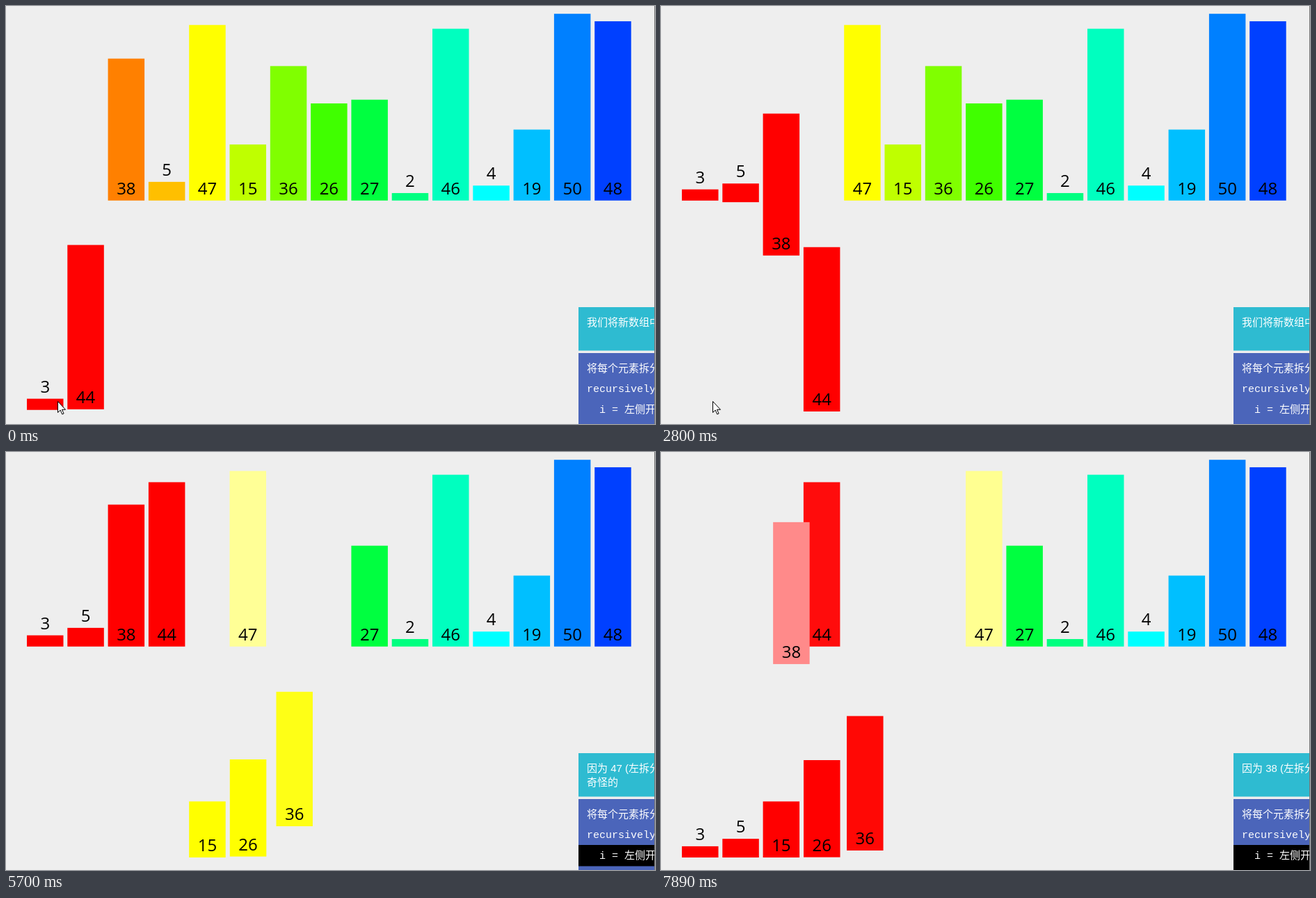
Recreate the animation shown at these times as an HTML page with a canvas. Size 933 by 601 pixels, loop 8000 ms.

```html
<!DOCTYPE html>
<html lang="zh">
<head>
<meta charset="utf-8">
<style>
  html, body { margin: 0; width: 100%; height: 100%; overflow: hidden; background: #eee; }
  canvas { display: block; }
</style>
</head>
<body>
<canvas id="stage" width="933" height="601"></canvas>
<script>
const ctx = document.getElementById('stage').getContext('2d');
const LOOP = 8000, MOVE = 240, TICK = 120, CURSOR_GONE = 5170;
const SLOT = 58.3, BAR = 52.5, LEFT = 30, FLOOR = 279.7, DROP = 303.3, UNIT = 5.37;
const SANS = '"Liberation Sans", "Noto Sans CJK SC", "Noto Sans CJK", sans-serif';
const MONO = '"Liberation Mono", "Noto Sans CJK SC", "Noto Sans CJK", monospace';

const values = [3, 44, 38, 5, 47, 15, 36, 26, 27, 2, 46, 4, 19, 50, 48];
const merges = [[0, 1, 2], [2, 3, 4], [0, 2, 4], [4, 5, 6], [6, 7, 8], [4, 6, 8], [0, 4, 8]];

// The picture is refreshed in runs of even ticks; each run starts at one of these times.
const runs = [0, 250, 400, 790, 940, 1090, 1240, 1510, 1900, 2290, 2680, 2950, 3100, 3370, 3880,
  4630, 4780, 5170, 5550, 5700, 6210, 6360, 6630, 7500, 7770, 8010];

// [step, start time]; steps in between are evenly spaced.
const beats = [[-3, -620], [-1, -236], [0, -29], [1, 178], [4, 728], [5, 930], [10, 1871], [11, 2078],
  [18, 3428], [23, 4385], [29, 5540], [33, 6304], [41, 7824], [61, 11640]];

const lerp = (a, b, k) => a + (b - a) * k;
const ease = t => t >= 1 ? 1 : t < 0.5 ? 4 * t ** 3 : 1 - 4 * (1 - t) ** 3;

// Colour wheel of 24 hues; pure green is skipped.
function hue(slot) {
  const h = slot < 8 ? slot : slot + 1;
  return [0, 8, 16].map(peak => {
    const d = Math.abs(h - peak);
    return Math.max(0, Math.min(255, (8 - Math.min(d, 24 - d)) * 63.75));
  });
}
const lighten = color => color.map(c => Math.min(255, c + 150));

function startOf(step) {
  const i = beats.findIndex(b => b[0] > step);
  const [a, ta] = beats[i - 1], [b, tb] = beats[i];
  return lerp(ta, tb, (step - a) / (b - a));
}

// Poses are [slot, row, r, g, b], one per value.
function buildSteps() {
  const steps = [], order = values.map((_, i) => i);
  const base = values.map((_, i) => hue(i));
  const goal = values.map((_, i) => [i, 0, ...base[i]]);
  const push = (message, lines) => steps.push({ message, lines, goal: goal.map(p => [...p]) });
  const paint = (id, color) => goal[id].splice(2, 3, ...color);

  for (const [lo, mid, hi] of merges) {
    const left = order.slice(lo, mid), right = order.slice(mid, hi), merged = [];
    const color = hue(lo);
    const markHeads = () => [left[0], right[0]].forEach(id => {
      if (id !== undefined) paint(id, lighten(base[id]));
    });
    markHeads();
    push(['我们现在合并拆分的部分'], [1]);
    while (left.length || right.length) {
      const l = values[left[0]], r = values[right[0]];
      const fromLeft = !right.length || l <= r;
      const message = !right.length ? ['因为右拆分是空的'] : !left.length ? ['因为左拆分是空的']
        : fromLeft ? [`因为 ${l} (左拆分) <= ${r}`] : [`因为 ${l} (左拆分) > ${r}`, '奇怪的'];
      const id = (fromLeft ? left : right).shift();
      goal[id][0] = lo + merged.push(id) - 1;
      goal[id][1] = 1;
      paint(id, color);
      markHeads();
      push(message, fromLeft ? [2, 3] : [2]);
    }
    merged.forEach((id, i) => {
      order[lo + i] = id;
      base[id] = color;
      goal[id][1] = 0;
      push(['我们将新数组中的元素'], []);
    });
  }

  steps.forEach((step, i) => {
    step.start = startOf(i - 3);
    step.from = i ? poseAt(steps[i - 1], step.start) : values.map((_, k) => [k, 0, ...hue(k)]);
  });
  return steps;
}

// Every step restarts the easing of all bars from wherever they are.
function poseAt(step, time) {
  const k = ease((time - step.start) / MOVE);
  return step.from.map((pose, id) => pose.map((v, j) => lerp(v, step.goal[id][j], k)));
}

function rect(color, x, y, w, h) {
  ctx.fillStyle = color;
  ctx.fillRect(x, y, w, h);
}

function text(str, x, y, font, color = '#fff', align = 'left') {
  ctx.font = font;
  ctx.fillStyle = color;
  ctx.textAlign = align;
  ctx.fillText(str, x, y);
}

function drawBars(poses) {
  const boxes = poses.map(([slot, row, ...rgb], id) => {
    const h = values[id] * UNIT;
    return { x: LEFT + slot * SLOT, y: FLOOR + row * DROP - h, h, rgb };
  });
  for (const { x, y, h, rgb } of boxes) rect(`rgb(${rgb.map(Math.round)})`, x, y, BAR, h);
  boxes.forEach(({ x, y, h }, id) => {
    const baseline = (values[id] < 8 ? y : y + h) - 9;
    text(values[id], x + BAR / 2, baseline, '24px "Open Sans", sans-serif', '#000', 'center');
  });
}

function drawPanel({ message, lines }) {
  rect('#2ebbd1', 823, 433, 110, 62.5);
  message.forEach((line, i) => text(line, 835, 460 + i * 20, `500 15px ${SANS}`));
  rect('#4b65ba', 823, 499, 110, 102);
  for (const n of lines) rect('#000', 823, 505 + n * 30, 110, 30.5);
  text('将每个元素拆分成', 835, 525.5, `15px ${MONO}`);
  text('recursively', 835, 554.5, `15px ${MONO}`);
  text('i = 左侧开头', 853, 585, `15px ${MONO}`);
  rect('#777', 932, 0, 1, 601);
}

const arrow = new Path2D('M74.5 568.5v16l3.7-3.5 2.6 6 2.3-1-2.6-5.7h5z');
function drawCursor() {
  ctx.fillStyle = '#fff';
  ctx.fill(arrow);
  ctx.strokeStyle = '#000';
  ctx.lineWidth = 1;
  ctx.stroke(arrow);
}

function heldTime(time) {
  const i = runs.findIndex(r => r > time);
  const begin = runs[i - 1], ticks = Math.floor((runs[i] - begin) / TICK);
  return begin + TICK * Math.min(ticks - 1, Math.floor((time - begin) / TICK));
}

const steps = buildSteps();
const origin = performance.now();

function draw() {
  const time = heldTime((performance.now() - origin) % LOOP);
  const step = steps.findLast(s => s.start <= time);
  rect('#eee', 0, 0, 933, 601);
  drawBars(poseAt(step, time));
  drawPanel(step);
  if (time < CURSOR_GONE) drawCursor();
  requestAnimationFrame(draw);
}
draw();
</script>
</body>
</html>
```
